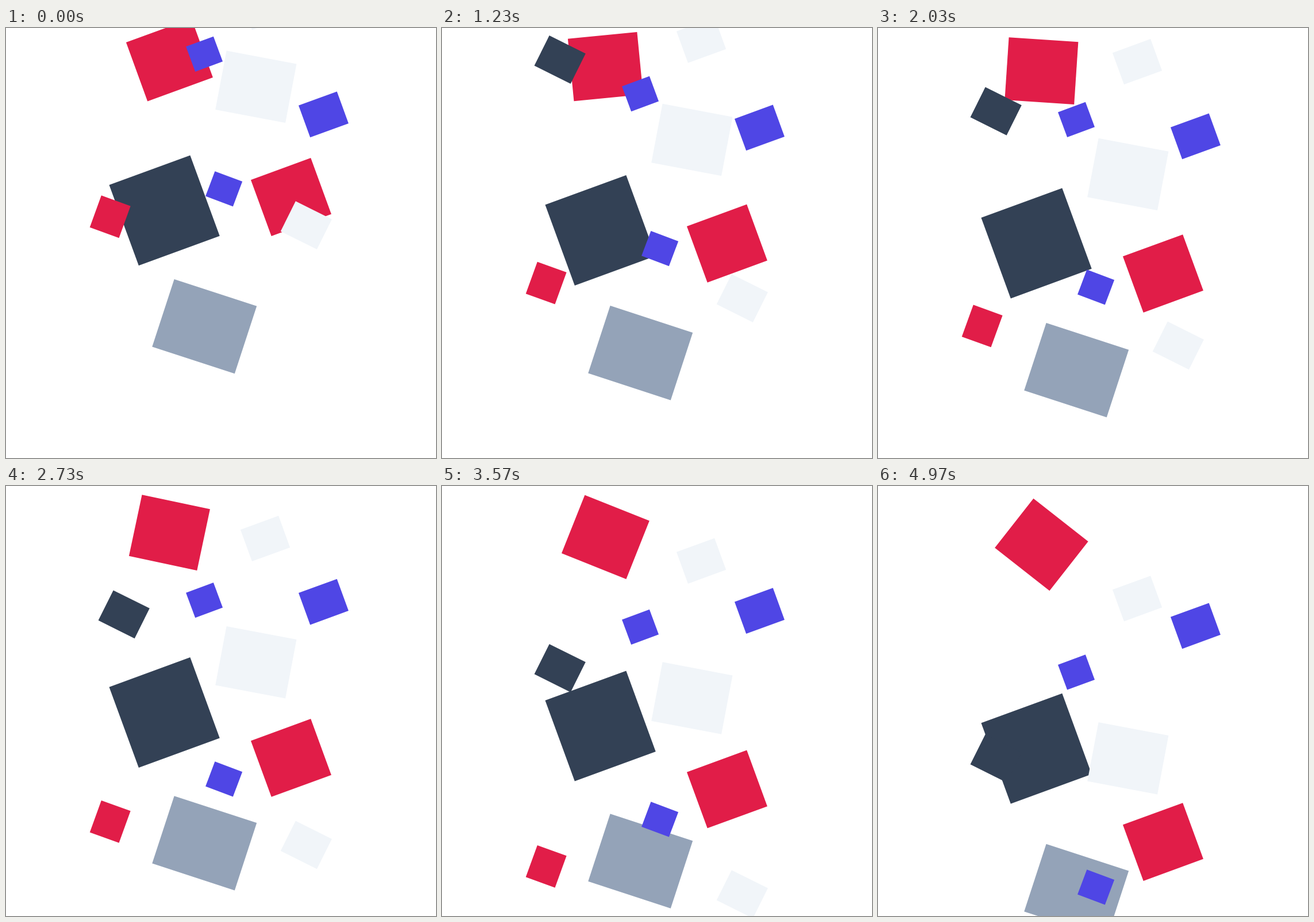
Animation, 748 px wide and 748 px high, one loop 5010 ms. Source, as an HTML page with a canvas:

```html
<!DOCTYPE html>
<html lang="en">
<head>
<meta charset="utf-8">
<title>Drifting blocks</title>
<style>
html, body { margin: 0; height: 100%; overflow: hidden; background: #fff; }
canvas { display: block; }
</style>
</head>
<body>
<canvas width="748" height="748"></canvas>
<script>
const ctx = document.querySelector('canvas').getContext('2d');
const LOOP = 5010, STEPS = 150;
const DRIFT = 0.3117, SPIN = 0.39;   // pixels and degrees per step
const red = '#e11d48', blue = '#4f46e5', dark = '#334155', grey = '#94a3b8', light = '#f1f5f9';

// Back to front: colour, centre x, centre y, width, height, angle.
// Each block drifts one unit faster than the one behind it.
const blocks = [
  [red, 284.4, 55.5, 121, 109, -20],
  [blue, 552.4, 150.4, 71, 59, -20],
  [dark, 275.6, 317.4, 150, 149.5, -20.1],
  [grey, 345.2, 519.1, 151, 123.6, 18.1],
  [light, 451, -36.4, 70.4, 58.6, -20],
  [blue, 345, 45.3, 51, 46.5, -20.3],
  [red, 495.9, 294, 111, 104, -20.1],
  [light, 434.8, 102.3, 124, 104.3, 10.7],
  [blue, 379.1, 279.8, 51, 46.3, 20.6],
  [red, 181.2, 328.3, 54, 59, 19.9],
  [light, 522.3, 343.2, 70.5, 58.5, 26.5],
  [dark, 205.2, -83.4, 70.5, 58.5, 26.5]
];

function draw(step) {
  ctx.fillStyle = '#fff';
  ctx.fillRect(0, 0, 748, 748);
  blocks.forEach(([color, x, y, w, h, angle], i) => {
    const turn = i === 0 ? SPIN * step : 0;
    ctx.save();
    ctx.translate(x, y + (i + 1) * DRIFT * step);
    ctx.rotate((angle + turn) * Math.PI / 180);
    ctx.fillStyle = color;
    ctx.fillRect(-w / 2, -h / 2, w, h);
    ctx.restore();
  });
}

// 30 steps per second, each starting on a 10 ms tick
function stepAt(ms) {
  const tick = Math.floor(ms / 10) * 10;
  return Math.min(STEPS - 1, Math.floor((tick + 3.4) * 0.03));
}

const start = performance.now();
function frame() {
  draw(stepAt((performance.now() - start) % LOOP));
  requestAnimationFrame(frame);
}
frame();
</script>
</body>
</html>
```
